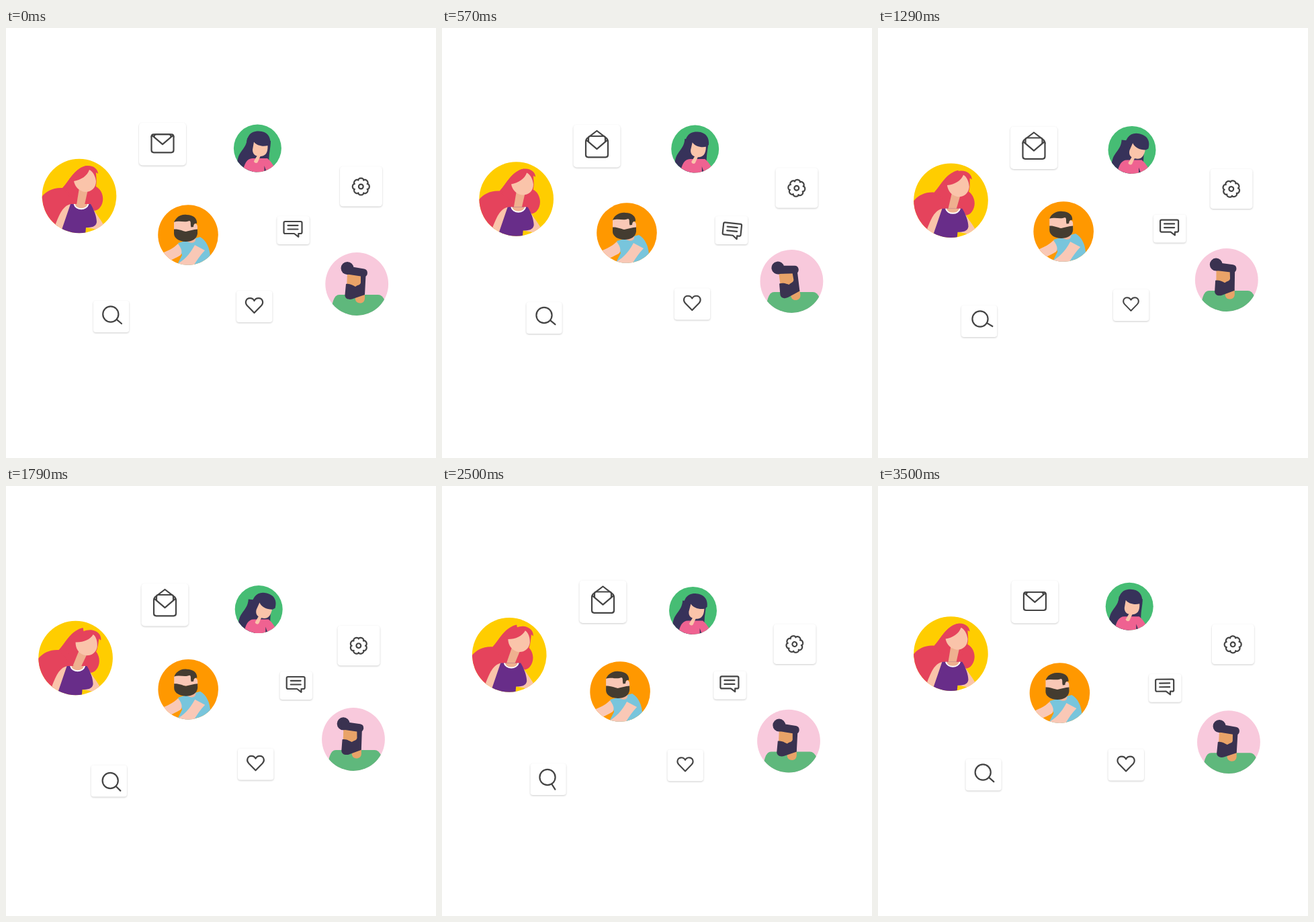
An HTML page that plays this animation: 640 px wide and 640 px high, repeating every 3.57 s.

```html
<!DOCTYPE html>
<html lang="en">
<head>
<meta charset="utf-8">
<title>Floating community</title>
<style>
  html, body { margin: 0; height: 100%; overflow: hidden; background: #fff; }
  svg { display: block; width: 100vw; height: 100vh; }
  .card { fill: #fff; filter: drop-shadow(0 1px 1px rgba(0, 0, 0, .2)); }
  .icon { fill: none; stroke: #444; stroke-width: 2.2; stroke-linecap: round; stroke-linejoin: round; }
  .paper { fill: #fff; }
</style>
</head>
<body>
<svg viewBox="0 0 640 640">
  <defs>
    <clipPath id="c1"><circle cx="109" cy="250" r="55.3"/></clipPath>
    <clipPath id="c2"><circle cx="271" cy="308" r="44.8"/></clipPath>
    <clipPath id="c3"><circle cx="374.4" cy="179" r="35.5"/></clipPath>
    <clipPath id="c4"><circle cx="522.2" cy="381" r="46.9"/></clipPath>
  </defs>

  <g id="mail">
    <rect class="card" x="198" y="141" width="70" height="63.5" rx="5"/>
    <g class="icon">
      <path id="flap"/>
      <path id="letter" class="paper"/>
      <path id="pocket" class="paper"/>
    </g>
  </g>

  <g id="gear">
    <rect class="card" x="497" y="206" width="63" height="59.5" rx="4.5"/>
    <g id="cog" class="icon">
      <path id="teeth"/>
      <circle cx="528.3" cy="236" r="3.4"/>
    </g>
  </g>

  <g id="chat">
    <rect class="card" x="403.4" y="280" width="48.4" height="42" rx="4"/>
    <path id="bubble" class="icon" stroke-width="2" d="M415.5 288H438.5Q440.5 288 440.5 290V304Q440.5 306 438.5 306H435.3V310.8L429 306H415.5Q413.5 306 413.5 304V290Q413.5 288 415.5 288ZM419.5 293.8H434.5M419.5 299.5H434.5"/>
  </g>

  <g id="like">
    <rect class="card" x="343" y="391" width="53.4" height="47" rx="4"/>
    <path id="heart" class="icon" d="M369.5 424L359 413.2C355 408.8 357 402.4 363 402.2C366 402.1 368.2 403.6 369.5 406C370.8 403.6 373 402.1 376 402.2C382 402.4 384 408.8 380 413.2Z"/>
  </g>

  <g id="search">
    <rect class="card" x="130" y="406" width="53.2" height="47" rx="4"/>
    <g id="lens" class="icon">
      <circle cx="155.8" cy="426" r="11.6"/>
      <path id="handle" d="M164.8 433.8L172 440"/>
    </g>
  </g>

  <g id="red"><g clip-path="url(#c1)">
    <circle cx="109" cy="250" r="56" fill="#ffcd00"/>
    <path fill="#e5435c" d="M50 256C56 245 68 237 84 238C92 230 98 218 106 212L134 236C144 241 148 257 140 267C136 273 128 273 122 270L98 264L72 302L46 296Z"/>
    <path fill="#e5435c" d="M84 239C94 226 104 208 120 205L128 250L106 264Z"/>
    <path fill="#fac4aa" d="M126 263C130 272 140 283 146 294L136 300L120 297Z"/>
    <path fill="#fac4aa" d="M97 262C85 264 79 277 72 297L70 304L86 308L104 270Z"/>
    <g id="redHead">
      <path fill="#e5435c" d="M86 238C95 224 105 207 120 205C130 204 137 210 137 217L134 215C134 222 136 230 133 238L120 252L103 256Z"/>
      <path fill="#efb08f" d="M109 238L122 240L117 263L105 263Z"/>
      <path fill="#fac4aa" d="M101 228C112 226 121 220 124 211C129 213 133 220 134 228C134 238 127 244 118 244C109 243 103 237 101 228Z"/>
    </g>
    <path fill="#682d89" d="M96 262H126C131 270 135 281 135 289C134 296 127 297 119 297L118 308H80L83 300Z"/>
    <path fill="#efb08f" stroke="#fff" stroke-width="2" d="M101.5 262C104 271.5 120 271.5 122.5 262"/>
  </g></g>

  <g id="orange"><g clip-path="url(#c2)">
    <circle cx="271" cy="308" r="46" fill="#ff9800"/>
    <path fill="#78c5dc" d="M256 320L270 316L289 311C298 316 304 328 304 342L296 354H254L262 338Z"/>
    <path fill="#efb59c" d="M268 312H282V316C281 320 276 321 270 318Z"/>
    <path fill="#f9c8b6" d="M230 336C240 332 248 329 256 321C261 328 263 333 260 338C254 342 246 345 238 349Z"/>
    <path fill="#f9c8b6" d="M281 323L296 331C289 338 284 346 279 354H250C262 348 272 340 281 323Z"/>
    <path fill="#f9c8b6" d="M250 288L277 284L279 292C282 290 285 292 285 296V303H250Z"/>
    <path fill="#443c30" d="M250 289C253 281 261 277 269 278C279 278 285 284 284 291C281 290 279 292 279 296L275.500 296.500C274 292 276 288 273 287C266 290 258 286 250 289Z"/>
    <path fill="#443c30" d="M250 299.500C257 299 262 302 267.500 303C273 302 279 300 285 299.500V306C284 314 277 318 267.500 318C258 318 250 313 250 306Z"/>
  </g></g>

  <g id="green"><g clip-path="url(#c3)">
    <circle cx="374.400" cy="179" r="37" fill="#46bd74"/>
    <path fill="#37325a" d="M359 164C358 182 344 182 344 204L350 218H372L380 195H386L392 202C390 190 394 180 394 168Z"/>
    <path fill="#ef6291" d="M352 217C354 203 358 194 367 194H389C394 198 399 205 401 212L387 217Z"/>
    <path fill="#37325a" d="M384.500 205L387 212L384.500 217Z"/>
    <g id="greenHead">
      <path fill="#37325a" d="M358 184C356 163 362 153.500 376 153.500C389 153.500 394 162 393.500 172C390 176 384 178 378 178L371 190Z"/>
      <path fill="#fac4aa" d="M369 169.500C373 175 382 177 389.500 175C390 186 386 191 378 191C370 191 367 187 367 181Z"/>
    </g>
    <path fill="#fac4aa" d="M375 188L379 190L374.500 200C373 202 369 201 369 198Z"/>
  </g></g>

  <g id="pink"><g clip-path="url(#c4)">
    <circle cx="522.200" cy="381" r="48" fill="#f8c9dc"/>
    <path fill="#5fb87c" d="M480 430L487 406Q490 397 496 397H554Q560 397 564 406L574 430Z"/>
    <g id="pinkHead">
      <path fill="#e9a368" d="M520 400L534 394V402C534 407 531 409.500 527 409.500C522 409.500 519 406 520 400Z"/>
      <path fill="#e9a368" d="M508 364L530 368V388H507Z"/>
      <path fill="#3a3250" d="M506 381C512 380 516 383 520 385C524 382 527 383 528 379V368H535.500L534 397L515 403.500C509 405 504 402 504.500 397Z"/>
      <circle cx="508" cy="357.500" r="9.500" fill="#3a3250"/>
      <path fill="#3a3250" d="M506 354L533 358.500A6 6 0 0 1 533 370.300L505 366Z"/>
    </g>
  </g></g>
</svg>
<script>
const $ = id => document.getElementById(id);
const LOOP = 3570, STEPS = 50;
const KEYS = [0, 8, 18, 25, 35, 43];

// Drift of each part from its resting place: x offsets, y offsets
const drift = {
  mail:   [[0, -2.5, -1, 3.5, 6.5, 3.5],      [0, 3, 5.5, 4, -.5, -1.5]],
  gear:   [[0, -.5, -2.5, -3.5, -3.5, -1.5],  [0, 2.3, 3.5, 1.7, -.5, -.5]],
  chat:   [[0, 3.2, 6.6, 4.2, .9, -.7],       [0, 0, -2.4, -4, -4.6, -2]],
  like:   [[0, 2.8, 7, 2, -7.5, -3.3],        [0, -3.7, -2, -.5, 1.3, 3.3]],
  search: [[0, -4.5, -6, -3.3, 1.5, 2.5],     [0, 2, 7, 9.5, 7, 3]],
  lens:   [[0, .7, 2.2, 2.7, -.3, -.3],       [0, -.5, 0, 3, .5, -1]],
  red:    [[0, 1.7, -.5, -5.4, -8.8, -5.2],   [0, 4.5, 6.7, 6, 1.4, -1.3]],
  orange: [[0, 4, 5.2, .2, -5.9, -3.7],       [0, -3, -5, -5.3, -2, -.8]],
  green:  [[0, 2.3, 3.6, 1.8, -.9, -.7],      [0, 1, 2.4, 4.6, 6.4, 4]],
  pink:   [[0, -1.8, -3.4, -5.2, -6.2, -3.8], [0, -4, -6, -4, -1.4, -.7]]
};

// Rotation: pivot x, pivot y, angles
const tilt = {
  redHead:   [112, 262, [0, .5, 4, 13, 10, 2]],
  greenHead: [375, 196, [0, 3, 14, 14, 5, 1]],
  pinkHead:  [525, 395, [0, -10, -2, -1, 0, 0]],
  bubble:    [403, 314, [0, 6, 0, 0, 0, 0]],
  handle:    [155.8, 426, [0, -1, -10, 4, 17, 4]]
};

const beat = [1, .98, .9, .98, .92, 1];

// Closed smooth curve through the key values
function curve(v, k) {
  const n = KEYS.length;
  const at = i => KEYS[(i + n) % n] + STEPS * Math.floor(i / n);
  const val = i => v[(i + n) % n];
  const slope = i => (val(i + 1) - val(i - 1)) / (at(i + 1) - at(i - 1));
  let i = n - 1;
  while (KEYS[i] > k) i--;
  const h = at(i + 1) - at(i), u = (k - at(i)) / h, w = 1 - u;
  return w * w * (1 + 2 * u) * val(i) + u * u * (3 - 2 * u) * val(i + 1)
    + h * u * w * (w * slope(i) - u * slope(i + 1));
}

function ramp(k, a, b) {
  const u = Math.min(1, Math.max(0, (k - a) / (b - a)));
  return u * u * (3 - 2 * u);
}

const place = (id, value) => $(id).setAttribute('transform', value);

function drawMail(k) {
  const open = ramp(k, 0, 5) - ramp(k, 43, 48);
  const up = ramp(k, 3, 8) - ramp(k, 36, 43);
  const top = 158.3 + 4 * open, low = top + 27;
  const peak = top - 12.3 * open, edge = top - 2 * open;
  const sheet = top + open - 5.3 * up;
  $('flap').setAttribute('d', `M216.5 ${top + 4}Q216.5 ${top} 219.5 ${edge}L233 ${peak}L246.5 ${edge}Q249.5 ${top} 249.5 ${top + 4}`);
  $('letter').setAttribute('d', `M220.5 ${top + 12}V${sheet + 3}Q220.5 ${sheet} 223.5 ${sheet}H242.5Q245.5 ${sheet} 245.5 ${sheet + 3}V${top + 12}`);
  $('pocket').setAttribute('d', `M217.5 ${top + 1.5}L233 ${top + 14.8}L248.5 ${top + 1.5}Q249.5 ${top + 2.5} 249.5 ${top + 4}V${low - 3.5}Q249.5 ${low} 246 ${low}H220Q216.5 ${low} 216.5 ${low - 3.5}V${top + 4}Q216.5 ${top + 2.5} 217.5 ${top + 1.5}Z`);
}

function drawTeeth() {
  const pts = [];
  for (let i = 0; i < 128; i++) {
    const a = i * Math.PI / 64, r = 10.2 + 2.3 * Math.sqrt(Math.abs(Math.cos(4 * a)));
    pts.push((528.3 + r * Math.cos(a)).toFixed(2) + ' ' + (236 + r * Math.sin(a)).toFixed(2));
  }
  $('teeth').setAttribute('d', 'M' + pts.join('L') + 'Z');
}

function render(k) {
  for (const id in drift) {
    const [x, y] = drift[id];
    place(id, `translate(${curve(x, k)} ${curve(y, k)})`);
  }
  for (const id in tilt) {
    const [x, y, angles] = tilt[id];
    place(id, `rotate(${curve(angles, k)} ${x} ${y})`);
  }
  place('cog', `rotate(${k * 45 / STEPS} 528.3 236)`);
  place('heart', `translate(369.5 413) scale(${curve(beat, k)}) translate(-369.5 -413)`);
  drawMail(k);
}

const start = performance.now();
let shown = -1;
function tick() {
  const t = (performance.now() - start) % LOOP;
  const k = Math.floor(t / LOOP * STEPS + .06) % STEPS;
  if (k !== shown) render(shown = k);
  requestAnimationFrame(tick);
}
drawTeeth();
tick();
</script>
</body>
</html>
```
